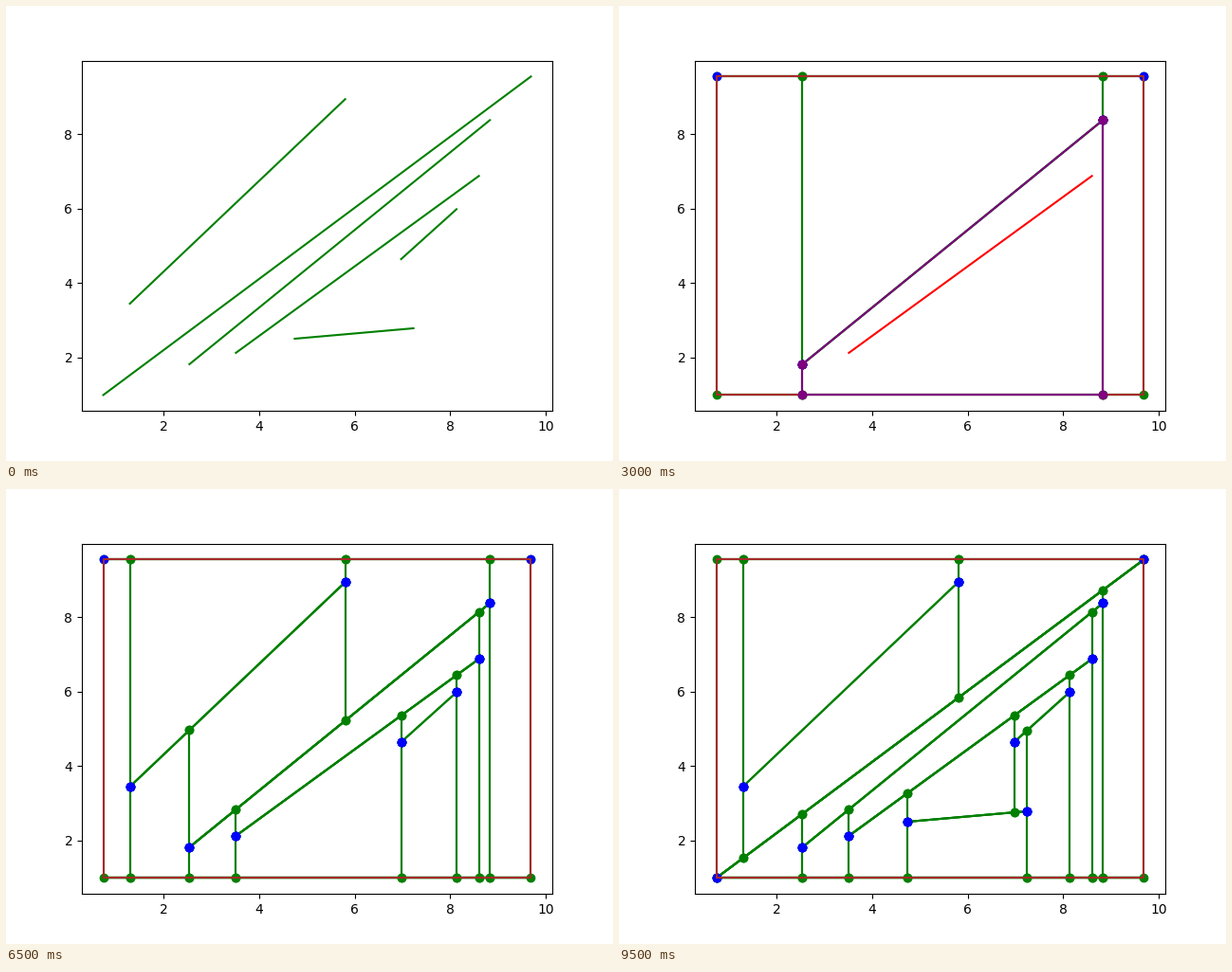
Write a matplotlib script that moves like this. It is 640x480 px and loops after 10 s.

```python
import matplotlib.pyplot as plt
from matplotlib.animation import FuncAnimation

LEFT, RIGHT, LOW, HIGH = 0.7338, 9.6894, 0.9822, 9.5536
FLOOR = ((LEFT, LOW), (RIGHT, LOW))
CEILING = ((LEFT, HIGH), (RIGHT, HIGH))

# Segments in the order they are inserted.
SEGMENTS = [
    ((2.5382, 1.8113), (8.8302, 8.3800)),
    ((3.5113, 2.1173), (8.6000, 6.8775)),
    ((1.2910, 3.4413), (5.7994, 8.9439)),
    ((6.9713, 4.6403), (8.1312, 5.9822)),
    ((4.7429, 2.4975), (7.2294, 2.7781)),
    ((LEFT, LOW), (RIGHT, HIGH)),
]


def height(segment, x):
    (x0, y0), (x1, y1) = segment
    return y0 + (y1 - y0) * (x - x0) / (x1 - x0)


def crosses(segment, trap):
    top, bottom, start, end = trap
    x0 = max(start[0], segment[0][0])
    x1 = min(end[0], segment[1][0])
    if x1 <= x0:
        return False
    x = (x0 + x1) / 2
    return height(bottom, x) < height(segment, x) < height(top, x)


def insert(segment, traps):
    """Return the crossed trapezoids and the refined map."""
    p, q = segment
    hit = sorted((t for t in traps if crosses(segment, t)),
                 key=lambda t: t[2][0])
    result = [t for t in traps if t not in hit]
    first, last = hit[0], hit[-1]
    if first[2][0] < p[0]:
        result.append((first[0], first[1], first[2], p))
    above_start = below_start = p
    for trap in hit:
        wall = q if trap is last else trap[3]
        is_above = wall[1] > height(segment, wall[0])
        if trap is last or is_above:
            result.append((trap[0], segment, above_start, wall))
            above_start = wall
        if trap is last or not is_above:
            result.append((segment, trap[1], below_start, wall))
            below_start = wall
    if q[0] < last[3][0]:
        result.append((last[0], last[1], q, last[3]))
    return hit, result


def corners(trap):
    top, bottom, start, end = trap
    x0, x1 = start[0], end[0]
    return [(x0, height(bottom, x0)), (x0, height(top, x0)),
            (x1, height(top, x1)), (x1, height(bottom, x1))]


def build_steps():
    traps = [(CEILING, FLOOR, CEILING[0], CEILING[1])]
    steps = [(None, traps, [], None), (traps, traps, [], None)]
    for segment in SEGMENTS:
        hit, refined = insert(segment, traps)
        steps.append((traps, traps, [], (segment, "C0")))
        steps.append((traps, traps, hit, (segment, "red")))
        steps.append((refined, refined, [], None))
        traps = refined
    return [(shown, hit, extra) for shown, _, hit, extra in steps]


fig, ax = plt.subplots(figsize=(6.4, 4.8), dpi=100)


def line(points, color):
    ax.plot(*zip(*points), color=color, lw=1.5)


def dots(points, color):
    ax.plot(*zip(*points), "o", color=color, ms=6)


def draw_map(traps):
    for trap in traps:
        a, b, c, d = corners(trap)
        for edge in (trap[0], trap[1], (a, b), (c, d)):
            line(edge, "green")
    for trap in traps:
        dots(corners(trap), "green")
    for trap in traps:
        dots(trap[2:], "blue")
    line([FLOOR[0], CEILING[0], CEILING[1], FLOOR[1], FLOOR[0]], "brown")


def draw_highlight(trap):
    points = corners(trap)
    for edge in zip(points, points[1:] + points[:1]):
        line(edge, "purple")
    dots(points + list(trap[2:]), "purple")


STEPS = build_steps()


def update(i):
    ax.clear()
    traps, hit, extra = STEPS[i]
    if traps is None:
        for segment in SEGMENTS:
            line(segment, "green")
    else:
        draw_map(traps)
    for trap in hit:
        draw_highlight(trap)
    if extra:
        line(*extra)
    ax.set(xlim=(0.286, 10.137), ylim=(0.5536, 9.982),
           xticks=range(2, 11, 2), yticks=range(2, 9, 2))
    return []


anim = FuncAnimation(fig, update, frames=len(STEPS), interval=500,
                     init_func=lambda: [], repeat=True, repeat_delay=0)
plt.show()
```
